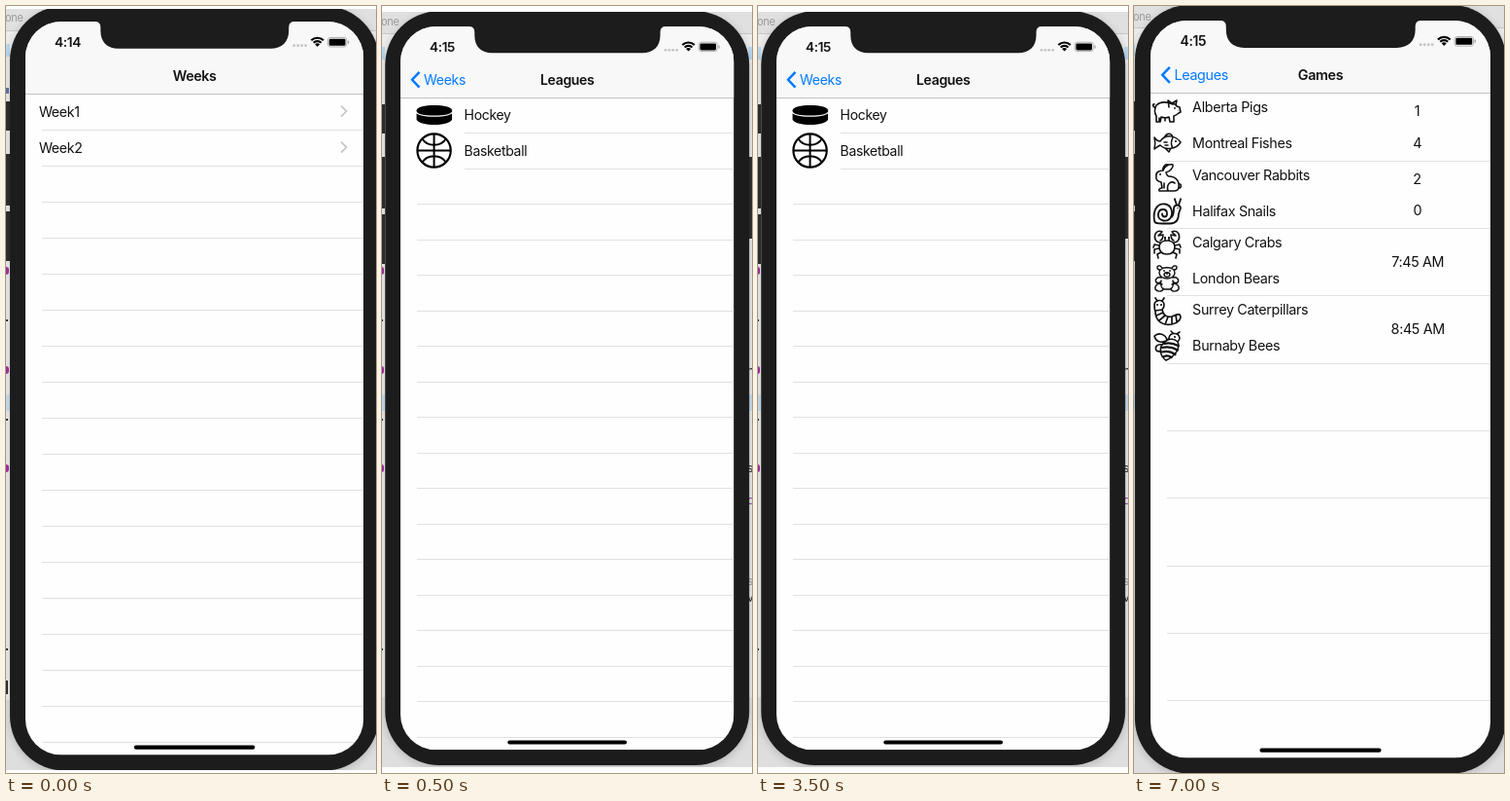
Animation, 381 px wide and 788 px high, one loop 8000 ms. Source, as an HTML page with a canvas:

```html
<!DOCTYPE html>
<html lang="en">
<head>
<meta charset="utf-8">
<title>Sports schedule</title>
<style>
  html, body { margin: 0; width: 100%; height: 100%; overflow: hidden; background: #fff; }
  canvas { display: block; }
</style>
</head>
<body>
<canvas id="stage" width="381" height="788"></canvas>
<script>
const W = 381, H = 788, LOOP = 8000;
const ctx = document.getElementById('stage').getContext('2d');
const FONT = 'Inter, "Open Sans", sans-serif';
const BLUE = '#007aff', INK = '#111', BODY = '#1c1c1c';

// Phone screen in points; each scene places it with its own origin and scale.
const SW = 414, SH = 896, BEZEL = 19, NAV = 88, ROW = 44, GAME = 82;

function rect(color, x, y, w, h) {
  ctx.fillStyle = color;
  ctx.fillRect(x, y, w, h);
}

function rounded(color, x, y, w, h, r) {
  ctx.fillStyle = color;
  ctx.beginPath();
  ctx.roundRect(x, y, w, h, r);
  ctx.fill();
}

function dot(x, y, r, color = INK) {
  ctx.fillStyle = color;
  ctx.beginPath();
  ctx.arc(x, y, r, 0, 7);
  ctx.fill();
}

function stroke(d, width, color = INK) {
  ctx.strokeStyle = color;
  ctx.lineWidth = width;
  ctx.stroke(new Path2D(d));
}

function text(str, x, y, { size = 17, weight = 400, color = INK, align = 'left' } = {}) {
  ctx.font = `${weight} ${size}px ${FONT}`;
  ctx.letterSpacing = -0.026 * size + 'px';
  ctx.textAlign = align;
  ctx.fillStyle = color;
  ctx.fillText(str, x, y);
}

// Crisp one-pixel rule across the list.
function rule(p, y, inset = 20, color = '#e1e1e3') {
  const left = Math.round(p.x + inset * p.s);
  const right = p.x + SW * p.s;
  ctx.save();
  ctx.resetTransform();
  rect(color, left, Math.round(p.y + y * p.s), right - left, 1);
  ctx.restore();
}

function statusBar(time) {
  text(time, 51.8, 30.9, { size: 16.4, weight: 600, align: 'center' });
  for (let i = 0; i < 4; i++) dot(329 + i * 4.7, 29.3, 1.7, '#c4c4c4');
  for (const r of [10.6, 6.6]) {
    ctx.beginPath();
    ctx.arc(357.5, 30.5, r, -Math.PI * 0.75, -Math.PI * 0.25);
    ctx.strokeStyle = '#000';
    ctx.lineWidth = 2.6;
    ctx.stroke();
  }
  ctx.fillStyle = '#000';
  ctx.fill(new Path2D('M357.5 30.8L354.5 27.6Q357.5 25.2 360.5 27.6Z'));
  ctx.beginPath();
  ctx.roundRect(370.3, 19.5, 23, 11.4, 3);
  ctx.strokeStyle = '#a5a5a5';
  ctx.lineWidth = 1;
  ctx.stroke();
  rounded('#000', 371.8, 21, 20, 8.4, 1.6);
  rounded('#a5a5a5', 394.6, 23.2, 1.6, 4, 0.8);
}

function navBar(p, title, back) {
  rect('#f8f8f8', 0, 0, SW, NAV);
  rule(p, NAV, 0, '#c2c2c4');
  text(title, SW / 2, 72.6, { weight: 600, align: 'center' });
  if (!back) return;
  stroke('M23.5 56.5L14.5 66L23.5 75.5', 3, BLUE);
  text(back, 29, 72.6, { color: BLUE });
}

function phone(p, time, title, back, list) {
  ctx.save();
  ctx.translate(p.x, p.y);
  ctx.scale(p.s, p.s);

  ctx.shadowColor = 'rgba(0,0,0,.2)';
  ctx.shadowBlur = 8;
  ctx.shadowOffsetY = 2;
  rounded(BODY, -BEZEL, -BEZEL, SW + 2 * BEZEL, SH + 2 * BEZEL, 67);
  ctx.shadowColor = 'transparent';

  ctx.save();
  ctx.beginPath();
  ctx.roundRect(0, 0, SW, SH, 44);
  ctx.clip();
  rect('#fefefe', 0, 0, SW, SH);
  navBar(p, title, back);
  statusBar(time);
  list(p);
  ctx.fillStyle = BODY;
  ctx.fill(new Path2D('M85 -1V0Q92 0 92 7V11C92 25 100 33 114 33H300' +
    'C314 33 322.5 25 322.5 11V7Q322.5 0 329.5 0V-1Z'));
  rounded('#000', 133, 884.2, 148, 5, 2.5);
  ctx.restore();
  ctx.restore();
}

// Lists

function weeks(p) {
  for (let y = NAV + ROW; y < SH; y += ROW) rule(p, y);
  ['Week1', 'Week2'].forEach((name, i) => {
    const y = NAV + i * ROW;
    text(name, 16.5, y + 28);
    stroke(`M386.5 ${y + 15}L393 ${y + 21.5}L386.5 ${y + 28}`, 2, '#c5c5ca');
  });
}

function puck() {
  ctx.fillStyle = '#000';
  ctx.fill(new Path2D('M20 104C20 95.5 64 95.5 64 104V115.5C60 124 24 124 20 115.5Z'));
  stroke('M19 105.5C23 113 61 113 65 105.5', 1.6, '#fff');
}

function basketball() {
  ctx.beginPath();
  ctx.arc(41.7, 153.7, 20.7, 0, 7);
  ctx.lineWidth = 2.6;
  ctx.strokeStyle = '#000';
  ctx.stroke();
  stroke('M41.7 133V174M21 153.7H62.5M27 139C33 149.5 50.5 149.5 56.5 139' +
    'M27 168.5C33 158 50.5 158 56.5 168.5', 2.4, '#000');
}

function leagues(p) {
  const inset = 79;
  for (let i = 1; NAV + i * ROW < SH; i++) rule(p, NAV + i * ROW, i < 3 ? inset : 20);
  text('Hockey', inset, NAV + 28);
  text('Basketball', inset, NAV + ROW + 28);
  puck();
  basketball();
}

// Animal drawings on a 30 by 30 grid: outline, stroke width, dots [x, y, r].
const ANIMALS = {
  pig: ['M21 8C15 5 8 5 4 9C2 13 2 17 4 20V26H8L9 21C12 22 15 22 17 21L18 26H22V20' +
    'C25 19 26 18 27 17L29 16L28 11L25 10C25 8 23 7 21 8M24 9L25 4L20 7M20 7L16 4L17 11' +
    'M3 11C0 11 0 7 2 8M13 22V25M7 25V22', 1.6, [[23, 12, .9], [27, 14, .6]]],
  fish: ['M2 9C4 12 6 13 8 13C13 6 23 6 29 14C24 22 13 22 8 17C6 18 4 19 2 21C3 17 3 13 2 9' +
    'M12 9C15 4 19 4 21 8.5M13 20L17 24L19 20M21 9C19 13 19 17 21 20M12 14H15M13 17H16',
    1.5, [[24, 13, 1.1]]],
  rabbit: ['M4 14C3 10 7 8 11 8C12 4 17 1 21 2C22 5 18 9 14 10C15 13 15 14 17 14C24 14 28 19 27 25' +
    'C27 28 25 29 22 29H7C6 27 8 26 10 26L9 20C5 19 3 17 4 14M11 8C10 5 13 1 16 2' +
    'M16 29C14 22 19 18 23 21M12 21V26M27 22C30 21 30 26 27 26', 1.6, [[8, 12, 1]]],
  snail: ['M2 26C0 14 6 8 13 9C20 10 22 19 18 24C14 28 5 26 6 19C7 13 15 13 15 19C15 23 10 23 10 19' +
    'M2 26C2 29 6 29 10 29H18C25 29 27 25 27 19L29 13C28 9 23 9 22 13C22 17 22 20 20 22' +
    'M25 10L23 4M27 10L29 4', 1.8, [[23, 4, 1.1], [29, 4, 1.1], [26, 13, .7]]],
  crab: ['M7 17C8 9 22 9 23 17C23 23 19 25 15 25C11 25 7 23 7 17M8 13C4 13 1 9 3 4C5 1 8 1 10 2' +
    'L6 6L11 5C11 8 10 10 8 11M22 13C26 13 29 9 27 4C25 1 22 1 20 2L24 6L19 5C19 8 20 10 22 11' +
    'M7 16L2 15L1 18M7 19L2 20L2 24M9 23L5 25L6 29M23 16L28 15L29 18M23 19L28 20L28 24' +
    'M21 23L25 25L24 29M13 11V8M17 11V8', 1.6, [[13, 8, 1.1], [17, 8, 1.1]]],
  bear: ['M7 9C7 2 23 2 23 9C23 17 7 17 7 9M8 6C4 6 4 1 8 2L10 4M22 6C26 6 26 1 22 2L20 4' +
    'M12 11C12 8 18 8 18 11C18 14 12 14 12 11M9 14C5 13 2 16 4 19C6 20 8 19 9 18' +
    'M21 14C25 13 28 16 26 19C24 20 22 19 21 18M9 17C8 21 9 24 11 26H19C21 24 22 21 21 17' +
    'M10 21C6 19 2 22 3 26C5 29 11 29 11 25M20 21C24 19 28 22 27 26C25 29 19 29 19 25',
    1.4, [[12, 7, .9], [18, 7, .9], [15, 10, 1]]],
  caterpillar: ['M2 7C2 1 12 1 12 7C12 9 11 11 10 12C11 18 15 20 20 19C23 18 25 16 28 17' +
    'C31 21 26 26 20 27C10 29 3 23 3 14C2 12 2 10 2 7M3 13L10 12M4 18L11 15M7 23L13 18' +
    'M13 27L16 19.5M20 27V19M25 24L24 17.5M5 3L3 0M10 3L12 0',
    1.7, [[5, 7, 1.1], [9, 7, 1.1]]],
  bee: ['M17 7C18 1 27 1 28 7C28 9 27 10 26 11C29 18 23 26 14 30C7 25 6 16 13 11C15 10 16 9 17 7' +
    'M14 10C18 7 23 8 26 11M14 10C8 13 3 10 2 5C7 1 13 3 15 9M10 14C5 13 2 16 4 20C6 21 8 21 9 20' +
    'M21 2L19 0M25 3L28 1', 1.6, [[23, 6, 1.1]]],
};
const BEE_STRIPES = 'M12 13Q19 11 26.5 15M10 17Q18 15 26 19.5M10 21.5Q17 19.5 23.5 24M12 26Q16 24.5 19.5 27';

function animal(name, x, y) {
  const [outline, width, dots] = ANIMALS[name];
  ctx.save();
  ctx.resetTransform();
  ctx.translate(x, y);
  ctx.lineCap = ctx.lineJoin = 'round';
  stroke(outline, width);
  dots.forEach(d => dot(...d));
  if (name === 'bee') stroke(BEE_STRIPES, 2.2);
  ctx.restore();
}

const MATCHES = [
  ['Alberta Pigs', 'Montreal Fishes', ['1', '4'], ['pig', 93], ['fish', 126]],
  ['Vancouver Rabbits', 'Halifax Snails', ['2', '0'], ['rabbit', 161], ['snail', 194.5]],
  ['Calgary Crabs', 'London Bears', '7:45 AM', ['crab', 230], ['bear', 265]],
  ['Surrey Caterpillars', 'Burnaby Bees', '8:45 AM', ['caterpillar', 300], ['bee', 334]],
];

function games(p) {
  for (let y = NAV + GAME; y < SH; y += GAME) rule(p, y);
  MATCHES.forEach(([home, away, result, ...icons], i) => {
    const y = NAV + i * GAME, mid = { align: 'center' };
    text(home, 51, y + 23.5);
    text(away, 51, y + 67.5);
    if (Array.isArray(result)) {
      text(result[0], 324.5, y + 28.3, mid);
      text(result[1], 325, y + 66.5, mid);
    } else {
      text(result, 325.5, y + 47.3, mid);
    }
    for (const [name, top] of icons) animal(name, 19, top);
  });
}

// Desktop behind the phone

function desktop(top, bottom, titleY) {
  rect('#ececec', 0, top, W, bottom - top);
  rect('#e0e0e0', 0, top, W, 22);
  rect('#c8c8c8', 0, top + 22, W, 1);
  rect('#dedede', 0, bottom - 72, W, 72);
  text('one', -1, titleY, { size: 11, color: '#9a9a9a' });
}

function leftScraps(w, dy) {
  rect('#b9d9f2', 0, 39 + dy, w, 13);
  rect('#2f2f31', 0, 98 + dy, w, 30);
  rect('#2f2f31', 0, 152 + dy, w, 53);
  rect('#2f2f31', 0, 211 + dy, w, 51);
  rect('#c9dff0', 0, 399, w, 17);
  for (const y of [268, 370, 471]) rounded('#a3309c', -3, y, w + 2, 8, 3);
  for (const y of [322, 424, 660]) rect('#333', 0, y, w - 2, 2);
}

function weeksScene() {
  desktop(3, 785, 16);
  leftScraps(4, 0);
  rect('#5b78a8', 0, 84, 3, 6);
  rect('#2f2f31', 0, 693, 2, 14);
  phone({ x: 20, y: 16, s: 0.841 }, '4:14', 'Weeks', '', weeks);
  rect('#fff', 0, 0, W, 3);
  rect('#fff', 0, 785, W, 3);
}

function leaguesScene() {
  desktop(6, 782, 20);
  leftScraps(3, 3);
  rect('#b9d9f2', 377, 42, 4, 13);
  rect('#2f2f31', 377, 155, 4, 84);
  rect('#c9dff0', 377, 399, 4, 17);
  const scraps = [['n', 379, '#222'], ['s', 479, '#222'], ['d', 512, '#8a3fa8'],
    ['s', 595, '#999'], ['v', 612, '#222']];
  for (const [c, y, color] of scraps) text(c, 376, y, { size: 12, color });
  phone({ x: 19, y: 21, s: 0.8295 }, '4:15', 'Leagues', 'Weeks', leagues);
  rect('#fff', 0, 0, W, 6);
  rect('#fff', 0, 782, W, 6);
}

function gamesScene() {
  desktop(0, H, 15);
  leftScraps(1, 0);
  phone({ x: 17, y: 15, s: 0.8455 }, '4:15', 'Games', 'Leagues', games);
}

function frame() {
  const t = performance.now() % LOOP;
  ctx.resetTransform();
  rect('#fff', 0, 0, W, H);
  if (t < 500) weeksScene();
  else if (t < 5500) leaguesScene();
  else gamesScene();
  requestAnimationFrame(frame);
}
frame();
</script>
</body>
</html>
```
